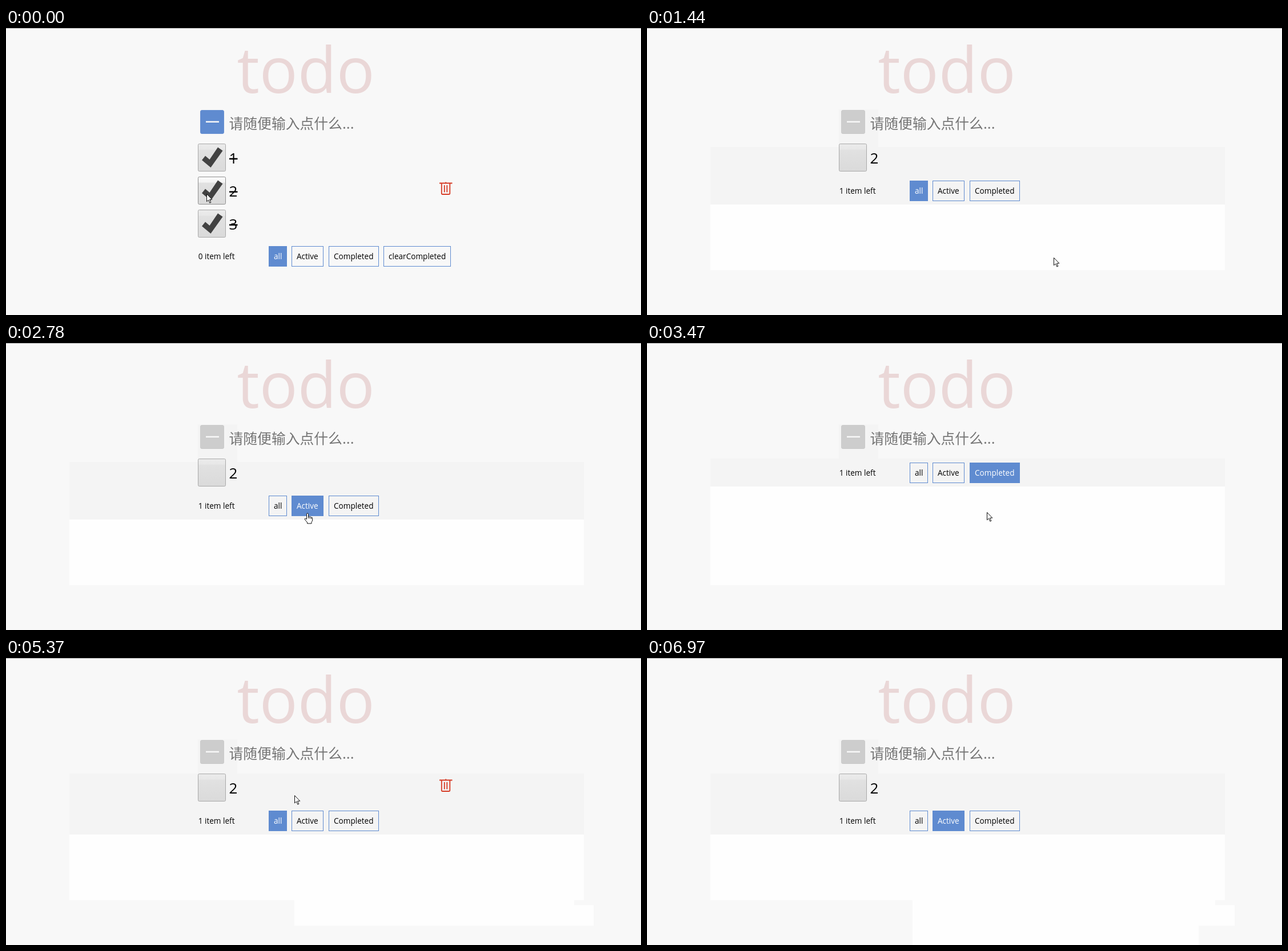
An HTML page with a canvas that plays this animation: 1112x504 px, repeating every 7.25 s.

```html
<!DOCTYPE html>
<html lang="zh-CN">
<head>
<meta charset="utf-8">
<style>
html, body { margin: 0; width: 100%; height: 100%; overflow: hidden; background: #f8f8f8; }
canvas { display: block; }
</style>
</head>
<body>
<canvas id="stage" width="1112" height="504"></canvas>
<script>
const c = document.getElementById('stage').getContext('2d');
const LOOP = 7250, STEP = 135, PITCH = 57.8;
const BLUE = '#5f8bd0', DARK = '#f4f4f4', LIGHT = '#fefefe';
const LATIN = '"Open Sans", "Noto Sans", sans-serif';
const CJK = '"Noto Sans CJK SC", "Noto Sans CJK", sans-serif';

// Moments of the clicks
const CHECK = 120, CLEAR = 1440;
const filters = [[0, 'all'], [2780, 'Active'], [3470, 'Completed'], [4040, 'all'], [5880, 'Active']];

// Pointer moves: start, number of steps, goal x and y
const moves = [
  [0, 1, 351, 291], [250, 1, 616, 345], [400, 4, 712, 403],
  [1570, 4, 492, 296], [2110, 3, 528, 299],
  [2930, 2, 610, 300], [3170, 1, 595, 297],
  [3620, 3, 470, 240], [4160, 1, 454, 223],
  [4430, 3, 650, 245], [4830, 3, 1017, 436],
  [5370, 1, 505, 241], [5490, 3, 530, 283],
  [6030, 2, 608, 270], [6460, 2, 471, 273], [6730, 3, 1000, 560]
];

const arrow = new Path2D('M.5 .5V13.8L3.6 11L5.8 16.2L7.8 15.4L5.6 10.2H9.8Z');
const hand = new Path2D('M-1.5 1.5Q-1.5 0 0 0T1.5 1.5V6Q3 5 4 6.5Q5.6 5.5 6.5 7.2Q8.6 6.6 8.6 9' +
  'V12Q8.6 14 7 15.5V18H-.5V16L-4.6 11Q-5.4 9 -3.6 9L-1.5 10.5ZM1.5 6V9M4 7V9.5M6.5 7.5V10');
const tick = new Path2D('M7 29L13 21.5L20.5 28L35 6.5L43.5 12.5L22.5 42Z');
const bin = new Path2D('M23.5 11.5H46M34.7 9.5V11.5M27.3 11.5V29.5Q27.3 31 29 31H40Q41.8 31 41.8 29.5V11.5M32.3 15V27.5M36.8 15V27.5');

const latest = (list, t) => list.findLastIndex(e => e[0] <= t);

function pointerAt(t) {
  const i = latest(moves, t);
  const [start, steps, x, y] = moves[i];
  const [, , x0, y0] = moves[Math.max(i - 1, 0)];
  const p = Math.min(1, (Math.floor((t - start) / STEP) + 1) / steps);
  const eased = 1 - (1 - p) ** 2;
  return [x0 + (x - x0) * eased, y0 + (y - y0) * eased].map(Math.round);
}

function box(x1, y1, x2, y2, color) {
  c.fillStyle = color;
  c.fillRect(x1, y1, x2 - x1, y2 - y1);
}

function rounded(x, y, w, h, r, fill, stroke) {
  c.beginPath();
  c.roundRect(x, y, w, h, r);
  c.fillStyle = fill;
  c.fill();
  c.strokeStyle = stroke;
  c.lineWidth = 1;
  c.stroke();
}

function text(str, x, y, size, color = '#000', family = LATIN) {
  c.font = `${size}px ${family}`;
  c.fillStyle = color;
  c.fillText(str, x, y);
}

function at(x, y, draw) {
  c.save();
  c.translate(x, y);
  draw();
  c.restore();
}

// Panel shades that stay behind after repaints
function backdrop(t, count) {
  box(0, 0, 1112, 504, '#f8f8f8');
  box(0, 0, 1112, 1, '#a3a3a3');
  if (t >= CHECK) box(336, 143, 405, t < CLEAR ? 407 : 209, DARK);
  if (t < CLEAR) {
    if (t >= 250) box(405, 261, 782, 363, DARK);
    if (t >= 400) box(616, 363, 782, 395, DARK);
    return;
  }
  const split = 252 + Math.round(PITCH * count);
  box(111, t < 3470 ? 209 : 203, 1012, split, DARK);
  box(111, split, 1012, 425.5, LIGHT);
  if (t >= 5100) box(842, 434, 1029, 470, LIGHT);
  if (t >= 5370) box(505, 425, 995, 470, LIGHT);
  if (t >= 6970) box(465, 425, 966, 504, LIGHT);
}

function header(allDone) {
  text('todo', 404.5, 113.5, 111, '#ead7d7');
  rounded(340.5, 144.5, 41, 41, 2.5, allDone ? BLUE : '#cdcdcd', allDone ? '#6c93d3' : '#cacaca');
  box(350, 163.5, 373, 166, '#f8f8f8');
  text('请随便输入点什么...', 390.5, 176.5, 24.8, '#757575', CJK);
}

function row(item, y, hover, over, focus) {
  at(336, y, () => {
    const shade = c.createLinearGradient(0, 0, 0, 48);
    shade.addColorStop(0, over ? '#fbfbfb' : '#ebebeb');
    shade.addColorStop(.2, over ? '#f4f4f4' : '#e8e8e8');
    shade.addColorStop(.24, '#e1e1e1');
    shade.addColorStop(1, '#dadada');
    rounded(.5, .5, 48, 48, 2, shade, over ? '#8f8f8f' : '#a9a9a9');
    if (focus) {
      c.strokeStyle = '#7ba4e4';
      c.lineWidth = 1.6;
      c.strokeRect(.7, .2, 49, 49);
    }
    if (item.done) {
      c.fillStyle = '#424242';
      c.fill(tick);
    }
    text(item.name, 54.5, 35, 26);
    if (item.done) box(55, 25.5, 69.5, 28, '#000');
    if (hover) {
      c.strokeStyle = '#d63a24';
      c.lineWidth = 1.8;
      at(399.5, 0, () => c.stroke(bin));
    }
  });
}

// Draws the bar and tells whether the pointer is on a button
function footer(top, left, labels, filter, px, py) {
  let x = 459.5, link = false;
  text(left + ' item left', 336.7, top + 22.5, 13.6);
  for (const label of labels) {
    const w = c.measureText(label).width + 18;
    const on = label === filter;
    c.fillStyle = c.strokeStyle = BLUE;
    c.lineWidth = 1;
    at(Math.round(x), top, () => {
      if (on) c.fillRect(0, 0, Math.round(w), 36);
      else c.strokeRect(.5, .5, Math.round(w) - 1, 35);
      text(label, 9, 22.5, 13.6, on ? '#fff' : '#000');
    });
    link ||= px >= x && px <= x + w && py >= top && py <= top + 35;
    x += w + 8.5;
  }
  return link;
}

function render(t) {
  const [px, py] = pointerAt(t);
  const filter = filters[latest(filters, t)][1];
  const cleared = t >= CLEAR, checked = t >= CHECK;
  const items = ['1', '2', '3'].map(name => ({ name, done: name !== '2' || !checked }))
    .filter(item => !cleared || !item.done)
    .filter(item => filter !== 'Completed' || item.done);

  backdrop(t, items.length);
  header(!checked);

  items.forEach((item, i) => {
    const y = 203 + Math.round(PITCH * i);
    const inRow = py >= y && py < y + 49;
    row(item, y, inRow && px >= 336 && px < 782, inRow && px >= 336 && px < 385,
      !cleared && checked && item.name === '2');
  });

  const labels = ['all', 'Active', 'Completed'];
  if (!cleared) labels.push('clearCompleted');
  const top = 210 + Math.round(PITCH * items.length);
  const shape = footer(top, checked ? 1 : 0, labels, filter, px, py) ? hand : arrow;

  at(px, py, () => {
    c.fillStyle = '#fff';
    c.fill(shape);
    c.strokeStyle = '#111';
    c.lineWidth = 1;
    c.lineJoin = 'round';
    c.stroke(shape);
  });
}

const start = performance.now();
function frame() {
  render((performance.now() - start) % LOOP);
  requestAnimationFrame(frame);
}
frame();
</script>
</body>
</html>
```
